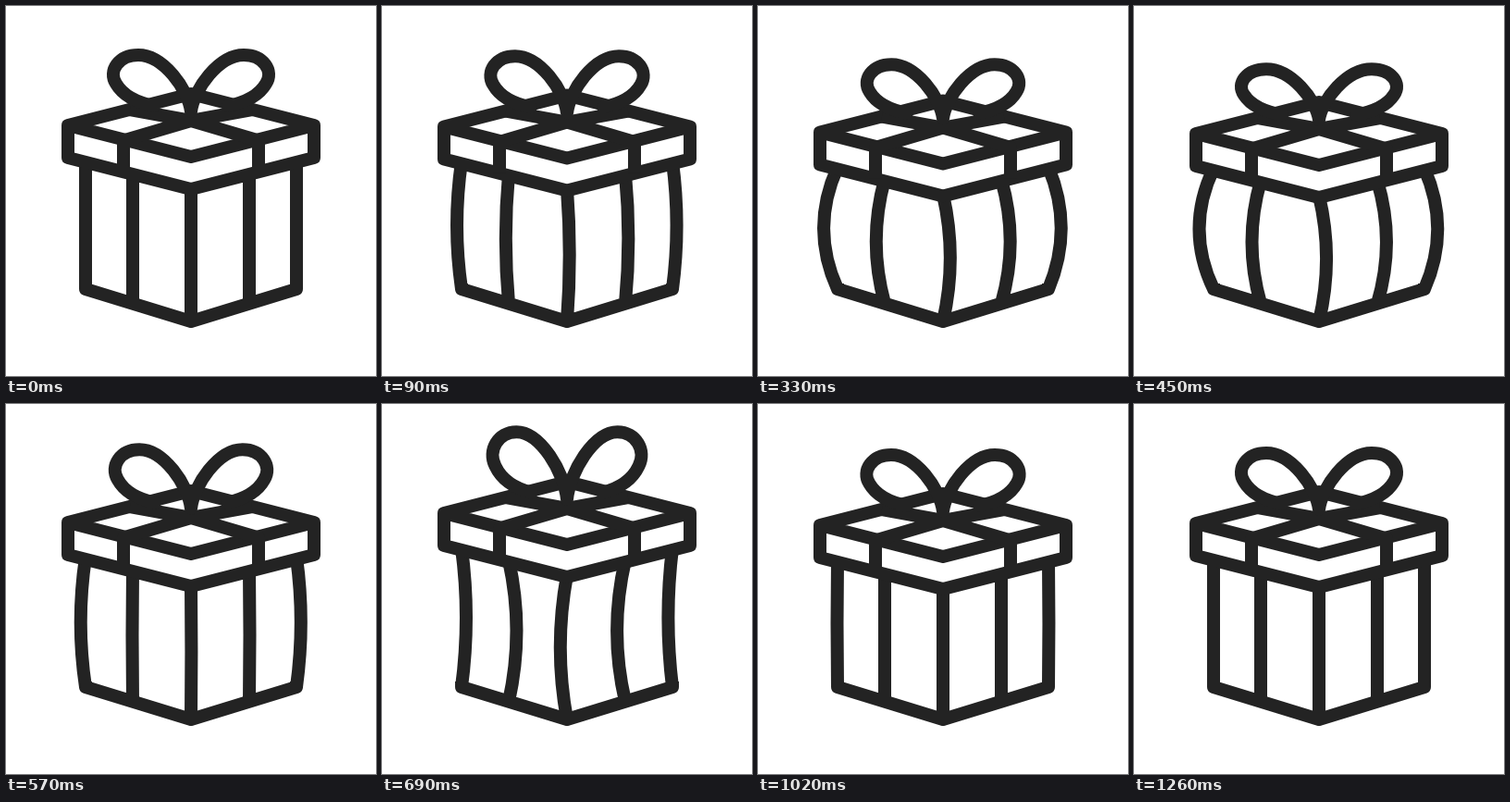
Recreate the animation shown at these times as an HTML page. Size 400 by 400 pixels, loop 1.82 s.

```html
<!DOCTYPE html>
<html lang="en">
<head>
<meta charset="utf-8">
<title>Gift box</title>
<style>
  html, body { margin: 0; width: 100%; height: 100%; overflow: hidden; background: #fff; }
  svg { display: block; width: 100%; height: 100%; }
  path { fill: none; stroke: #232323; stroke-width: 14; stroke-linejoin: round; }
  #bow { stroke-linecap: round; }
</style>
</head>
<body>
<svg viewBox="0 0 400 400">
  <path id="body"/>
  <g id="lid">
    <path d="M67 129L200 95L333 129V164L200 198L67 164Z M67 129L200 163L333 129"/>
    <path d="M127 179V145.5L200 124L266 112 M273 179V145.5L200 124L134 112"/>
    <path id="bow"/>
  </g>
</svg>
<script>
  const LOOP = 1820, END = 1260, STEP = 30;

  // time, lid drop, outer bulge, inner bulge, bow width, bow height
  const KEYS = [
    [0, 0, 0, 0, 1, 1],
    [210, 5, 13.5, 8.5, 0.957, 1.016],
    [450, 9, 15.5, 9.5, 1, 0.9],
    [690, -11, -5, -8.5, 0.957, 1.19],
    [870, 0, -0.5, -1.5, 0.983, 1.03],
    [1020, 2, 0.5, 0, 0.983, 1],
    [1140, -0.8, 0, 0, 0.995, 1.015],
    [END, 0, 0, 0, 1, 1]
  ];

  const body = document.getElementById('body');
  const lid = document.getElementById('lid');
  const bow = document.getElementById('bow');

  const secant = (i, c) => (KEYS[i + 1][c] - KEYS[i][c]) / (KEYS[i + 1][0] - KEYS[i][0]);

  // Flat tangents at turning points keep the curve from overshooting
  function tangent(i, c) {
    if (i === 0 || i === KEYS.length - 1) return 0;
    const a = secant(i - 1, c), b = secant(i, c);
    return a * b > 0 ? 2 * a * b / (a + b) : 0;
  }

  function sample(t, c) {
    let i = 0;
    while (i < KEYS.length - 2 && t >= KEYS[i + 1][0]) i++;
    const a = KEYS[i], b = KEYS[i + 1], h = b[0] - a[0];
    const u = (t - a[0]) / h, v = 1 - u;
    return (1 + 2 * u) * v * v * a[c] + u * v * v * h * tangent(i, c)
      + u * u * (3 - 2 * u) * b[c] - u * u * v * h * tangent(i + 1, c);
  }

  function side(x, bulge, drop) {
    const d = Math.abs(x - 200);
    const top = 196 - d * 0.256 + drop, bottom = 341 - d * 0.307;
    return `M${x} ${top}Q${x + 2 * bulge} ${(top + bottom) / 2} ${x} ${bottom}`;
  }

  // One loop, measured from the knot; dir mirrors it
  function loop(dir, w, h) {
    const p = (x, y) => `${200 + dir * x * w} ${115 + y * h} `;
    return 'M' + p(0, -1)
      + 'C' + p(3, -25) + p(30, -62) + p(57, -62)
      + 'C' + p(78, -62) + p(90, -45) + p(81, -31)
      + 'C' + p(74, -19) + p(60, -11) + p(40, -7);
  }

  function draw(t) {
    const [drop, outer, inner, w, h] = [1, 2, 3, 4, 5].map(c => sample(t, c));
    body.setAttribute('d', side(86, -outer, drop) + side(137, -inner, drop)
      + side(200, inner * 0.85, drop) + side(263, inner * 1.05, drop)
      + side(314, outer * 0.92, drop) + 'M86 300V306L200 341L314 306V300');
    lid.setAttribute('transform', `translate(0 ${drop})`);
    bow.setAttribute('d', loop(-1, w, h) + loop(1, w, h));
  }

  const start = performance.now();
  function tick() {
    const t = (performance.now() - start) % LOOP;
    draw(Math.min(END, Math.floor(t / STEP) * STEP));
    requestAnimationFrame(tick);
  }
  tick();
</script>
</body>
</html>
```
